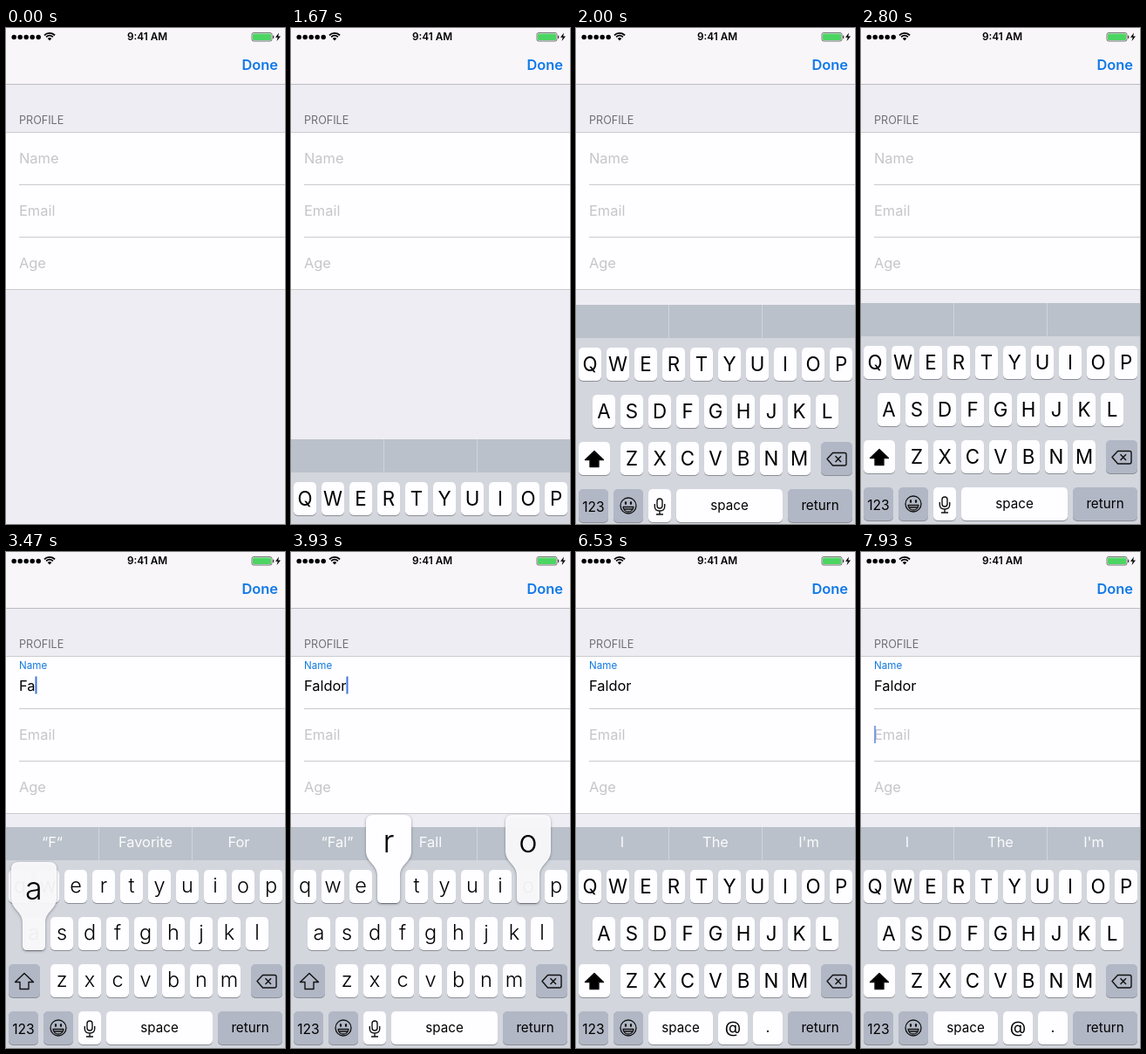
Write an HTML page with a canvas that moves like this. It is 320 px wide and 568 px high and loops after 8000 ms.

```html
<!DOCTYPE html>
<html lang="en">
<head>
<meta charset="utf-8">
<title>Profile form</title>
<style>
  html, body { margin: 0; width: 100%; height: 100%; overflow: hidden; background: #eeedf3; }
  canvas { display: block; width: 320px; height: 568px; }
</style>
</head>
<body>
<canvas id="stage"></canvas>
<script>
const LOOP = 8000, TICK = 1000 / 15;
const WHITE = '#fefdff', LINE = '#cbcad0', HINT = '#c6c5cb', BLUE = '#1079e0';
const BODY = 16.4;
const NAME = 'Faldor';
const PRESSES = [3070, 3330, 3530, 3660, 3800, 3930];
const LOWER_AT = 3200, EMAIL_AT = 5730;
const ROWS = [
  { keys: 'QWERTYUIOP', x: 3, y: 364 },
  { keys: 'ASDFGHJKL', x: 19, y: 418 },
  { keys: 'ZXCVBNM', x: 51, y: 472 }
];
const SUGGESTIONS = [
  [0, []],
  [3200, ['“F“', 'Favorite', 'For']],
  [3600, ['“Fa”', 'Far', 'Fast']],
  [3860, ['“Fal”', 'Fall', 'False']],
  [4330, [`“${NAME}”`]],
  [EMAIL_AT, []],
  [6200, ['I', 'The', "I'm"]]
];
// [start, duration, alpha at end]
const BLINKS = [
  [2003, 200, 1], [2533, 267, 0], [3070, 1, 1], [4533, 267, 0], [5067, 200, 1],
  [6263, 267, 0], [6803, 200, 1], [7263, 267, 0], [7803, 200, 1]
];

const canvas = document.getElementById('stage');
const ctx = canvas.getContext('2d');
const ratio = window.devicePixelRatio || 1;
canvas.width = 320 * ratio;
canvas.height = 568 * ratio;

const clamp = v => Math.max(0, Math.min(1, v));

function rect(x, y, w, h, color) {
  ctx.fillStyle = color;
  ctx.fillRect(x, y, w, h);
}

function setFont(size, weight = 400) {
  ctx.font = `${weight} ${size}px Inter, Roboto, sans-serif`;
}

function text(str, x, y, size, color, align = 'left', weight = 400) {
  setFont(size, weight);
  ctx.textAlign = align;
  ctx.fillStyle = color;
  ctx.fillText(str, x, y);
}

function rounded(x, y, w, h, r, color) {
  ctx.beginPath();
  ctx.roundRect(x, y, w, h, r);
  ctx.fillStyle = color;
  ctx.fill();
}

function stroke(path, width = 1.4, color = '#111') {
  ctx.strokeStyle = color;
  ctx.lineWidth = width;
  ctx.stroke(new Path2D(path));
}

function fill(path, color = '#000') {
  ctx.fillStyle = color;
  ctx.fill(new Path2D(path));
}

function circle(x, y, r, color = '#000') {
  ctx.beginPath();
  ctx.arc(x, y, r, 0, Math.PI * 2);
  ctx.fillStyle = color;
  ctx.fill();
}

function statusBar() {
  rect(0, 0, 320, 64, '#f8f6f9');
  rect(0, 64, 320, 1, '#bdbcc1');
  for (let i = 0; i < 5; i++) circle(9.2 + i * 7, 10.4, 2.75);
  for (const r of [8.2, 5.3]) {
    ctx.beginPath();
    ctx.arc(50, 14, r, -Math.PI * 0.76, -Math.PI * 0.24);
    ctx.strokeStyle = '#000';
    ctx.lineWidth = 1.8;
    ctx.stroke();
  }
  fill('M50 14.4 L47.7 11.9 Q50 10 52.3 11.9 Z');
  text('9:41 AM', 162, 14.2, 11.8, '#000', 'center', 600);
  ctx.beginPath();
  ctx.roundRect(282, 5.5, 23, 9.5, 2);
  ctx.strokeStyle = '#555';
  ctx.lineWidth = 0.8;
  ctx.stroke();
  rounded(283, 6.5, 21, 7.5, 1, '#4cd562');
  rounded(306, 8.5, 1.3, 3.5, 0.6, '#444');
  fill('M313 5.5 L309 10.8 H311.7 L310.6 15 L315 9.5 H312.2 Z');
  text('Done', 312, 48, 16.4, '#1079e8', 'right', 600);
}

function cursorAlpha(t) {
  let alpha = 0;
  for (const [start, duration, end] of BLINKS) {
    if (t >= start) alpha += (end - alpha) * clamp((t - start) / duration);
  }
  return t >= EMAIL_AT && t < 6263 ? 1 : alpha;
}

function form(t) {
  text('PROFILE', 15, 109.5, 12.6, '#717076');
  rect(0, 119, 320, 181, WHITE);
  for (const y of [119, 299]) rect(0, y, 320, 1, LINE);
  for (const y of [179, 239]) rect(15, y, 305, 1, LINE);

  const typed = NAME.slice(0, PRESSES.filter(p => t >= p).length);
  if (typed) {
    const p = 1 - (1 - clamp((t - PRESSES[0]) / 300)) ** 2;
    ctx.globalAlpha = p;
    text('Name', 15, 134 + 15 * (1 - p), 11.6, BLUE);
    ctx.globalAlpha = 1;
    text(typed, 15, 158.7, BODY, '#000');
  } else {
    text('Name', 15, 154.8, BODY, HINT);
  }
  text('Email', 15, 214.8, BODY, HINT);
  text('Age', 15, 274.8, BODY, HINT);

  setFont(BODY);
  const inEmail = t >= EMAIL_AT;
  const x = inEmail || !typed ? 15 : 15 + ctx.measureText(typed).width;
  const y = inEmail ? 199 : typed ? 142.5 : 139;
  ctx.globalAlpha = cursorAlpha(t);
  rect(x, y, 2, 20, '#3f72dc');
  ctx.globalAlpha = 1;
}

function key(x, y, w, dark) {
  rounded(x, y + 1, w, 38, 5, '#8b8e95');
  rounded(x, y, w, 38, 5, dark ? '#b1b7c5' : WHITE);
}

function keyWithText(x, w, label, baseline, size, dark) {
  key(x, 526, w, dark);
  text(label, x + w / 2, baseline, size, '#000', 'center');
}

function letterKeys(upper) {
  for (const { keys, x, y } of ROWS) {
    [...keys].forEach((letter, i) => {
      const kx = x + i * 32;
      key(kx, y, 26);
      if (upper) text(letter, kx + 13, y + 27.3, 22.3, '#000', 'center');
      else text(letter.toLowerCase(), kx + 13, y + 26, 23.5, '#000', 'center', 300);
    });
  }
}

function controlKeys(upper, email) {
  const arrow = 'M21 482.5 L31.5 492.5 H26 V500.5 H16 V492.5 H10.5 Z';
  key(3, 472, 36, !upper);
  if (upper) fill(arrow);
  stroke(arrow);

  key(281, 472, 36, true);
  stroke('M288 491.5 L294.5 484.5 H308 Q310 484.5 310 486.5 V497 Q310 499 308 499 H294.5 Z M297.5 488.3 L304 495 M304 488.3 L297.5 495');

  keyWithText(3, 34, '123', 551.7, 15.6, true);
  key(43, 526, 34, true);
  stroke('M51 545 A9 9 0 1 1 69 545 A9 9 0 1 1 51 545 Z M54 546.5 H66 Q65 552 60 552 Q55 552 54 546.5 Z M55 549 H65', 1.3);
  ctx.fillStyle = '#111';
  for (const x of [57, 63]) {
    ctx.beginPath();
    ctx.ellipse(x, 542, 1.2, 2, 0, 0, Math.PI * 2);
    ctx.fill();
  }
  if (email) {
    keyWithText(83, 74, 'space', 550, 15.2);
    keyWithText(163, 34, '@', 551, 19);
    keyWithText(203, 34, '.', 550, 17);
  } else {
    key(83, 526, 26);
    stroke('M93 540 a3 3 0 0 1 6 0 v5 a3 3 0 0 1 -6 0 Z M90.3 543 V546 Q90.3 551 96 551 Q101.7 551 101.7 546 V543 M96 551 V555 M92 555 H100');
    keyWithText(115, 122, 'space', 550, 15.2);
  }
  keyWithText(243, 74, 'return', 550, 15.2, true);
}

function popup(letter, alpha) {
  const row = ROWS.find(r => r.keys.includes(letter.toUpperCase()));
  const x = row.x + row.keys.indexOf(letter.toUpperCase()) * 32, y = row.y;
  const half = `M${x + 13} ${y - 63}`
    + ` h18 q8 0 8 8 v33 c0 14 -13 15 -13 29 v26 q0 5 -5 5 h-16`
    + ` q-5 0 -5 -5 v-26 c0 -14 -13 -15 -13 -29 v-33 q0 -8 8 -8 Z`;
  ctx.save();
  ctx.globalAlpha = alpha;
  ctx.shadowColor = 'rgba(60,65,75,.55)';
  ctx.shadowBlur = 3 * ratio;
  ctx.shadowOffsetY = ratio;
  fill(half, WHITE);
  ctx.restore();
  text(letter, x + 13, y - 20, 36, '#000', 'center', 300);
}

function keyboard(t) {
  const phase = Math.max(0, t - 1588) * 0.0169;
  const hidden = (1 + phase) * Math.exp(-phase);
  if (hidden > 0.999) return;
  const email = t >= EMAIL_AT;
  const upper = t < LOWER_AT || email;

  ctx.save();
  ctx.translate(0, Math.round(253 * hidden));
  rect(0, 315, 320, 253, '#d3d6dd');
  rect(0, 315, 320, 38, '#bac1ca');
  for (const x of [106, 213]) rect(x, 315, 1, 38, '#d0d5db');
  const words = SUGGESTIONS.filter(([at]) => t >= at).pop()[1];
  words.forEach((word, i) => text(word, 53 + i * 107, 338, BODY, '#fbfbfd', 'center'));
  letterKeys(upper);
  controlKeys(upper, email);
  PRESSES.forEach((at, i) => {
    const age = t - at;
    if (age >= 0 && age < 200) popup(NAME[i], age < 130 ? 1 : 0.93);
  });
  ctx.restore();
}

function draw(now) {
  const t = Math.floor((now % LOOP + 7) / TICK) * TICK % LOOP;
  ctx.setTransform(ratio, 0, 0, ratio, 0, 0);
  ctx.lineJoin = 'round';
  rect(0, 0, 320, 568, '#eeedf3');
  statusBar();
  form(t);
  keyboard(t);
}

const startTime = performance.now();
function frame() {
  draw(performance.now() - startTime);
  requestAnimationFrame(frame);
}
frame();
</script>
</body>
</html>
```
